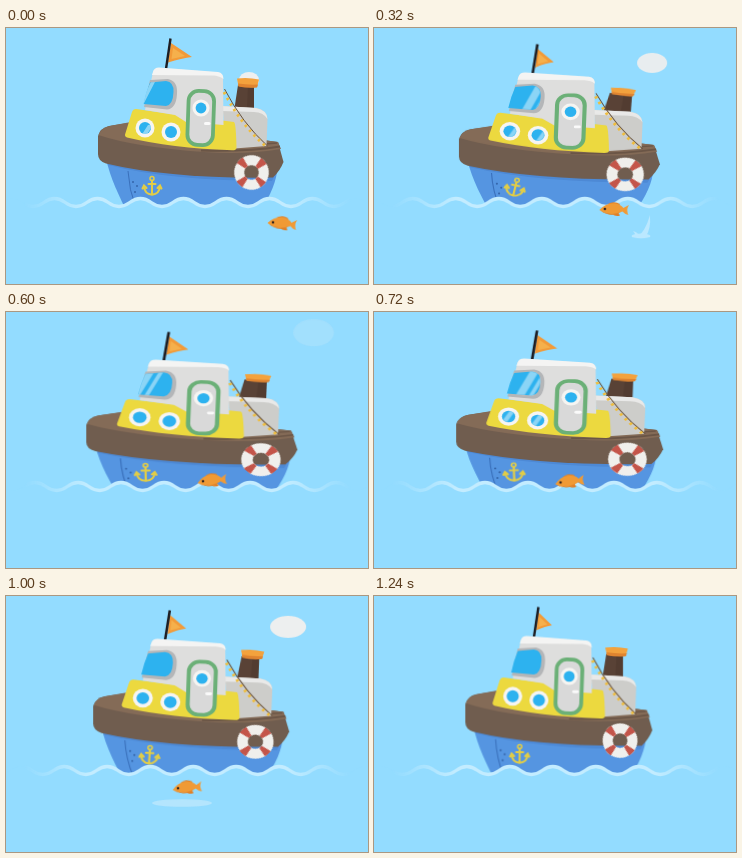
An HTML page that plays this animation: 362x256 px, repeating every 1.28 s.

```html
<!DOCTYPE html>
<html lang="en">
<head>
<meta charset="utf-8">
<title>Little boat</title>
<style>
html, body { margin: 0; width: 100%; height: 100%; overflow: hidden; background: #93dcff; }
svg { display: block; width: 100vw; height: 100vh; }
.a { animation: 1280ms linear infinite; }

#boat { transform-origin: 177px 213px; animation-name: squash; }
@keyframes squash {
  0%, 3.125%, 100% { transform: scale(1, 1); }
  37.5% { transform: scale(1.13, .956); }
  43.75% { transform: scale(1.141, .952); }
  50% { transform: scale(1.135, .954); }
  56.25% { transform: scale(1.116, .96); }
  78.125% { transform: scale(1.057, .981); }
}
#chimney { transform-origin: 239px 80px; animation-name: pump; }
@keyframes pump {
  0%, 3.125%, 100% { transform: none; }
  12.5% { transform: rotate(4deg) scale(1.01, .92); }
  25% { transform: rotate(4deg) scale(1.06, .82); }
  37.5% { transform: rotate(2deg) scale(1.05, .86); }
  56.25% { transform: rotate(2deg) scale(1.06, .83); }
  78.125% { transform: rotate(2deg) scale(1, .98); }
  96.875% { transform: scale(1.02, .98); }
}
#stack { transform-origin: 239px 80px; animation-name: bulge; }
@keyframes bulge {
  0%, 3.125%, 100% { transform: none; }
  25% { transform: scaleX(1.2); }
  56.25% { transform: scaleX(1.15); }
  78.125% { transform: scaleX(1.03); }
}
#flag { transform-origin: 163px 24px; animation-name: flap; }
@keyframes flap {
  0%, 3.125%, 100% { transform: none; }
  12.5% { transform: scaleX(.9); }
  25% { transform: scaleX(.72); }
  37.5% { transform: scaleX(.78); }
  56.25% { transform: scaleX(.85); }
  78.125% { transform: scaleX(.74); }
  96.875% { transform: scale(.64, .94); }
}
#anchor { transform-origin: 146px 149px; animation-name: swing; }
@keyframes swing {
  0%, 3.125%, 100% { transform: none; }
  12.5% { transform: translateX(1px) rotate(10deg); }
  25% { transform: rotate(13deg); }
  37.5% { transform: translateX(-1.5px) rotate(0deg); }
  56.25% { transform: translateX(-2.5px) rotate(-2deg); }
  78.125% { transform: rotate(4deg); }
}
#glint { animation-name: glint; }
@keyframes glint {
  0%, 6.25% { transform: translateX(-20px); }
  34.375% { transform: translateX(24px); }
  34.4%, 40.625% { transform: translateX(-20px); }
  68.75%, 100% { transform: translateX(24px); }
}
.drift { animation-name: drift; }
@keyframes drift {
  0%, 3.125% { transform: none; }
  100% { transform: translateX(-43px); }
}
#puff1 { animation-name: puff1; }
@keyframes puff1 {
  0%, 3.125% { transform: translate(243px, 52px) scale(10, 8); opacity: 1; }
  12.5% { transform: translate(258px, 44px) scale(12, 8); opacity: 1; }
  25% { transform: translate(278px, 35px) scale(15, 10); opacity: .95; }
  37.5% { transform: translate(297px, 26px) scale(18.5, 12.3); opacity: .7; }
  50%, 100% { transform: translate(311px, 19px) scale(21, 14); opacity: 0; }
}
#puff2 { animation-name: puff2; }
@keyframes puff2 {
  0%, 56.25% { transform: translate(250px, 68px) scale(6, 4); opacity: 0; }
  59.375% { transform: translate(250px, 62px) scale(9, 6); opacity: 1; }
  78.125% { transform: translate(282px, 31px) scale(18, 11); opacity: 1; }
  93.75% { transform: translate(306px, 8px) scale(22, 14); opacity: .12; }
  96.875%, 100% { transform: translate(311px, 3px) scale(23, 15); opacity: 0; }
}
#fish { animation-name: leap; }
@keyframes leap {
  0%, 3.125% { transform: translate(276px, 195px) rotate(4deg); }
  12.5% { transform: translate(261px, 189px) rotate(-4deg); }
  25% { transform: translate(240px, 181px) rotate(0deg); }
  37.5% { transform: translate(220px, 172px) rotate(-6deg); }
  46.875% { transform: translate(206px, 168px) rotate(-8deg); }
  56.25% { transform: translate(195.500px, 169px) rotate(-9deg); }
  65.625% { transform: translate(188px, 176px) rotate(-9deg); }
  78.125% { transform: translate(181px, 191px) rotate(-7deg); }
  84.375% { transform: translate(177px, 202px) rotate(-14deg); }
  90.625%, 100% { transform: translate(173px, 220px) rotate(-20deg); }
}
#splash { transform-origin: 267px 209px; animation-name: splash; }
@keyframes splash {
  0%, 4% { transform: scale(.5, .1); opacity: 0; }
  12.5% { transform: scale(1, .6); opacity: 1; }
  25% { transform: none; opacity: .9; }
  34.375%, 100% { transform: scale(1, .4); opacity: 0; }
}
#ripple { transform-origin: 176px 207px; animation-name: ripple; }
@keyframes ripple {
  0%, 68.75% { transform: scale(.2, .4); opacity: 0; }
  78.125% { transform: none; opacity: 1; }
  87.5% { transform: scale(1.05, .95); opacity: .6; }
  96.875%, 100% { transform: scale(1.1, .6); opacity: 0; }
}
</style>
</head>
<body>
<svg viewBox="0 0 362 256" preserveAspectRatio="none">
  <defs>
    <linearGradient id="fade">
      <stop offset="0" stop-color="#fff" stop-opacity="0"/>
      <stop offset=".2" stop-color="#fff"/>
      <stop offset=".8" stop-color="#fff"/>
      <stop offset="1" stop-color="#fff" stop-opacity="0"/>
    </linearGradient>
    <mask id="ends" maskUnits="userSpaceOnUse" x="0" y="160" width="362" height="30">
      <rect x="18" y="160" width="327" height="30" fill="url(#fade)"/>
    </mask>
    <path id="sea" d="M-5.250 174.500q10.750 -8 21.500 0t21.500 0t21.500 0t21.500 0t21.500 0t21.500 0t21.500 0t21.500 0t21.500 0t21.500 0t21.500 0t21.500 0t21.500 0t21.500 0t21.500 0t21.500 0t21.500 0t21.500 0t21.500 0t21.500 0V270H-5.250Z"/>
    <path id="pane" d="M144 54.500L160 53Q168 54 167.500 64Q167 77 160 78L137.500 76Q140 64 144 54.500Z"/>
    <clipPath id="glass">
      <use href="#pane"/>
      <circle cx="139" cy="100" r="6"/>
      <circle cx="165" cy="104" r="6"/>
    </clipPath>
    <clipPath id="above"><rect width="362" height="208"/></clipPath>
    <g id="port">
      <circle r="9.500" fill="#f6f5f2"/>
      <circle r="6" fill="#2db2ef"/>
    </g>
  </defs>

  <rect width="362" height="256" fill="#93dcff"/>
  <circle id="puff1" class="a" r="1" fill="#eeefef"/>
  <circle id="puff2" class="a" r="1" fill="#eeefef"/>

  <g id="boat" class="a">
    <!-- flag -->
    <g id="flag" class="a">
      <path d="M165 15L186 29Q176 30 162 34.500Z" fill="#f29a38"/>
      <path d="M167 20L179 28L165.500 31Z" fill="#f5b04c"/>
    </g>
    <path d="M164.500 10.500L160 41" stroke="#1d1d22" stroke-width="2.400"/>

    <!-- chimney -->
    <g id="chimney" class="a">
      <g id="stack" class="a">
        <path d="M232 57L248 58L248 82L228.500 80Z" fill="#594236"/>
        <path d="M242 58L248 58L248 82L241 81Z" fill="#523c31"/>
      </g>
      <path d="M231 50.500Q242 49 253 51.500L251 59Q242 60 232.500 58Z" fill="#f3a23d"/>
      <path d="M232 55.500Q242 57 252 56.500L251 59.500Q242 60.500 232.500 58.500Z" fill="#df8430"/>
    </g>

    <!-- hull -->
    <path d="M100 130C104 150 113 168 124 190L250 190C262 172 269 158 271 144Z" fill="#5595e1"/>
    <path d="M101 134Q165 151 268 149L266 153Q165 153 102 137Z" fill="#4d89d5"/>
    <path d="M122 143Q123 162 130 180" fill="none" stroke="#3a70bb"/>
    <g fill="#3566ab">
      <circle cx="127" cy="154" r="1"/><circle cx="131" cy="158" r="1"/><circle cx="129" cy="164" r="1"/>
    </g>
    <path d="M92 108Q94 100 103 98L122 95L272 114L277.500 134Q274 143 267 149.500Q165 151 100 135.500Q92 133 92 126Z" fill="#705d4f"/>
    <path d="M92.500 107Q95 99 106 97.500L125 94L272 114L275 121Q240 127 198 124Q128 119 92.500 107Z" fill="#846b57"/>
    <path d="M195 122.500Q240 124 274 118.500" fill="none" stroke="#6a5546" stroke-width="1.800"/>
    <path d="M245 117L271 115" stroke="#6b5647" stroke-width="1.400"/>

    <!-- rear box -->
    <path d="M216 78L250 80Q261 82 261.500 91L260.500 118L222 121Z" fill="#cdcdca"/>
    <path d="M216 78L250 80Q261 82 261.500 91Q257 84 248 84L216 83Z" fill="#e9e9e8"/>

    <!-- cabin -->
    <path d="M130 81L180 88L228 94Q230 95 230.500 120Q230 122.500 226 122.300Q165 120 121 109.500Q118 108.500 119.500 105L126 84Q127 81 130 81Z" fill="#ecd93f"/>
    <path d="M147 44Q148 40 153 40L212 44.500Q217 45 217 50L217.500 97L180 94L169 87L139 82Z" fill="#dededd"/>
    <path d="M147 44Q148 39.500 153 39.500L212 44Q217.500 45 217.500 51Q214 48 208 47.500L146 47Z" fill="#f4f4f3"/>
    <path d="M144 52L162 51Q172 53 171 66Q170 81 161 81.500L138 79" fill="#b4b6b8"/>
    <use href="#pane" fill="#2db2ef"/>

    <!-- door -->
    <rect x="182" y="63" width="25.500" height="54" rx="10" fill="#d9d9d9" stroke="#6bb077" stroke-width="3.800" transform="rotate(2 195 90)"/>
    <use href="#port" transform="translate(195 80) scale(.9)"/>
    <rect x="198" y="94" width="6.500" height="3" rx="1.500" fill="#fafafa"/>

    <use href="#port" x="139" y="100"/>
    <use href="#port" x="165" y="104"/>
    <g clip-path="url(#glass)">
      <g id="glint" class="a" fill="#fff" opacity=".45">
        <path d="M155 50h8L147 81h-8ZM167 50h4L155 81h-4Z"/>
        <path d="M136 93h5L132 107h-5ZM162 97h5L158 111h-5Z"/>
      </g>
    </g>

    <!-- bunting -->
    <path d="M218.500 61Q236 95 261.500 118" fill="none" stroke="#66503b"/>
    <path d="M218 64Q235 97 260 118.500" fill="none" stroke="#f0bd3c" stroke-width="2.800" stroke-dasharray="2.500 4"/>

    <!-- anchor -->
    <g id="anchor" class="a" fill="none" stroke="#e2cd46" stroke-width="2" stroke-linecap="round">
      <circle cx="146" cy="150.500" r="2" stroke-width="1.500"/>
      <path d="M146 152.500V166.500M142.500 156H149.500M138 158Q138.500 166 146 166.800Q153.500 166 154 158M136.500 160.500L138 157.500L140.500 160M151.500 160L154 157.500L155.500 160.500"/>
    </g>

    <!-- lifebuoy -->
    <g transform="translate(245.500 144.500) rotate(45)" fill="none" stroke-width="10">
      <circle r="12.300" stroke="#f0efec"/>
      <circle r="12.300" stroke="#c4554a" stroke-dasharray="6 13.320" stroke-dashoffset="3"/>
    </g>
  </g>

  <!-- water -->
  <use href="#sea" class="a drift" fill="#93dcff"/>
  <g mask="url(#ends)">
    <use href="#sea" class="a drift" fill="none" stroke="#c3ecff" stroke-width="3.200"/>
  </g>

  <!-- fish -->
  <g id="splash" class="a" fill="#c0eaff">
    <ellipse cx="267" cy="208" rx="9.500" ry="2.300"/>
    <path d="M264 208Q271 204 276 187Q277 201 272 208ZM265 208Q264 204 259 203Q262 207 262 208Z"/>
  </g>
  <ellipse id="ripple" class="a" cx="176" cy="207" rx="30" ry="3.800" fill="#b4e5fd"/>
  <g clip-path="url(#above)">
    <g id="fish" class="a">
      <path d="M-6 -5Q0 -8.500 6 -5L5 -3ZM-2 5Q2 8 6 6.500L4 3Z" fill="#e07f27"/>
      <path d="M-14.500 1Q-7 -7 2 -5.500Q7 -4.500 9.500 -1L15 -4Q12 1 14.500 6Q10.500 5 8.500 2.500Q-3 9 -14.500 1Z" fill="#f09a35"/>
      <path d="M-13 2Q-4 7.500 7 3Q-3 9 -13 2Z" fill="#dd7e28"/>
      <circle cx="-9" cy="0" r="1.300" fill="#33261f"/>
    </g>
  </g>
</svg>
</body>
</html>
```
